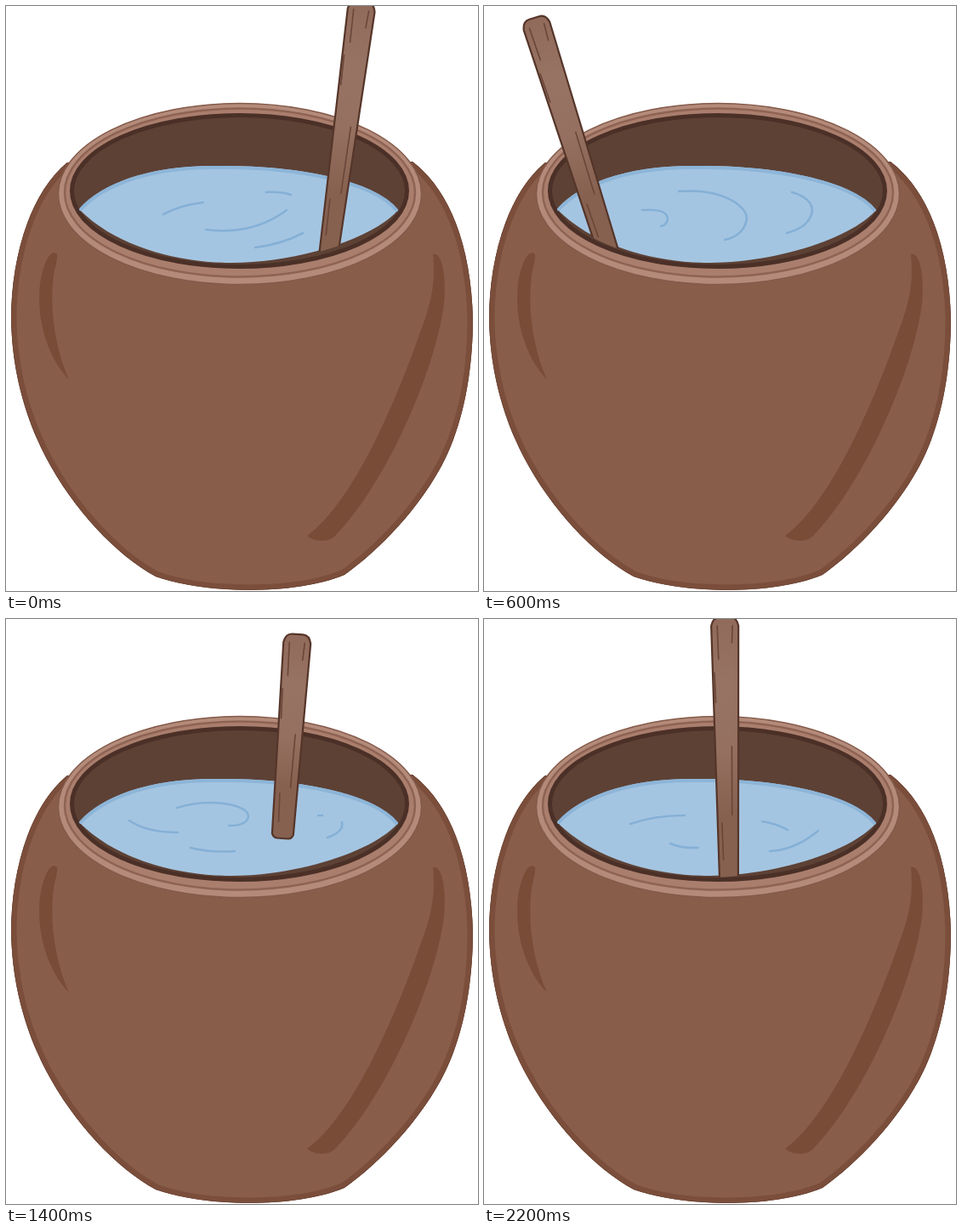
Write an HTML page that moves like this. It is 555 px wide and 688 px high and loops after 2400 ms.

```html
<!DOCTYPE html>
<html lang="en">
<head>
<meta charset="utf-8">
<title>Stirring a clay pot</title>
<style>
html, body { margin: 0; width: 100%; height: 100%; overflow: hidden; background: #fff; }
svg { display: block; width: 555px; height: 688px; fill: none; stroke-linecap: round; stroke-linejoin: round; }
</style>
</head>
<body>
<svg viewBox="0 0 555 688">
  <defs>
    <path id="body" d="M72 184C26 222 6 300 6 368C7 430 23 485 47 531C79 592 130 646 176 671C235 692 340 693 398 669C450 632 500 573 522 520C541 475 549 420 549 368C547 290 526 220 478 183Z"/>
    <clipPath id="inBody"><use href="#body"/></clipPath>
    <clipPath id="abovePot"><path d="M0-20H555V242H463C430 277 340 303 265 304C200 304 128 284 84 241H0Z"/></clipPath>
    <linearGradient id="wood" x2="0" y2="1">
      <stop offset="0" stop-color="#906a5a"/>
      <stop offset=".25" stop-color="#977363"/>
      <stop offset=".5" stop-color="#957060"/>
      <stop offset=".75" stop-color="#866150"/>
      <stop offset="1" stop-color="#866150"/>
    </linearGradient>
  </defs>

  <g clip-path="url(#inBody)">
    <use href="#body" fill="#885d4a" stroke="#7b4e3b" stroke-width="13"/>
    <use href="#body" stroke="#6d4637" stroke-width="1.5"/>
  </g>
  <g fill="#794c38">
    <path d="M60 292C53 285 44 300 40 327C35 372 51 416 74 439C57 401 50 350 57 311Q61 297 60 292Z"/>
    <path d="M502 292C513 288 518 320 515 350C505 430 446 562 388 622C380 632 362 630 354 623C408 584 459 465 489 378C504 340 504 315 502 292Z"/>
  </g>

  <ellipse cx="275" cy="221" rx="213.500" ry="106.500" fill="#b48b7a" stroke="#845a4a" stroke-width="1.500"/>
  <ellipse cx="275" cy="219.500" rx="206" ry="99" fill="#aa7e6d" stroke="#8e6353" stroke-width="2.500"/>
  <ellipse cx="274.500" cy="217.500" rx="197" ry="89" fill="#5d4135" stroke="#4b3027" stroke-width="5"/>
  <path d="M86 239C112 210 165 187 250 188C335 187 432 203 461 240C430 275 340 302 265 302C200 302 128 282 86 239Z" fill="#a4c5e1"/>
  <path d="M88 239C113 212 166 189 250 190C334 189 430 205 459 240" stroke="#8db5d8" stroke-width="4"/>
  <path id="ripples" stroke="#85b0d6" stroke-width="2.600"/>

  <g clip-path="url(#abovePot)">
    <g id="stick">
      <path id="shaft" fill="url(#wood)" stroke="#553529" stroke-width="2.200"/>
      <path id="grain" stroke="#694638" stroke-width="1.600"/>
    </g>
  </g>
</svg>
<script>
const $ = id => document.getElementById(id);

// Each pose: top x, y, bottom x, y of the stick, its foot width, and the ripples.
const poses = [
  [419, -5, 379, 294, 22, "M185 245Q205 234 232 231M235 263Q290 270 330 240M306 219Q322 218 335 222M293 284Q325 280 349 267"],
  [283, -2, 288, 308, 22, "M172 241Q200 231 236 231M219 264Q233 270 252 269M327 238Q345 241 357 248M336 273Q365 272 393 249"],
  [153, 7, 200, 303, 23, "M150 240Q147 244 149 248M252 226C310 219 360 230 361 256Q358 276 328 276M253 262Q280 264 299 257M374 236Q392 236 397 249"],
  [59, 14, 147, 292, 24, "M186 240Q215 238 216 250Q215 258 208 259M229 218C280 214 309 235 309 250Q306 270 283 275M362 219Q386 226 386 241Q383 260 356 267"],
  [195, 9, 231, 257, 24, "M146 232Q160 245 190 246M253 217C295 213 318 230 311 243Q304 253 283 256M250 272Q275 275 295 270M373 229Q394 236 385 254"],
  [343, 18, 325, 258, 25, "M145 237Q165 251 202 251M201 222C240 210 285 218 285 232Q284 243 262 243M217 269Q240 275 269 273M367 231h5M395 239Q398 250 378 257"]
];

function drawPose([x, y, bx, by, foot, ripples]) {
  const len = Math.hypot(bx - x, by - y);
  const angle = Math.atan2(x - bx, by - y) * 180 / Math.PI;
  const b = foot / 2;
  $("stick").setAttribute("transform", `translate(${x} ${y}) rotate(${angle})`);
  $("shaft").setAttribute("d",
    `M-16 10Q-14 0 -6 0H6Q14 0 16 10L${b} ${len - 5}Q${b - 2} ${len} ${b - 6} ${len}H${6 - b}Q${2 - b} ${len} ${-b} ${len - 5}Z`);
  $("grain").setAttribute("d",
    `M-9 10L-8 49M9 10L8 30M6 ${len * .49}L5 ${len * .75}M-7 ${len * .78}L-6 ${len * .92}M-13 65L-12 100`);
  $("ripples").setAttribute("d", ripples);
}

// One full turn forward, then the same turn backward.
function frame() {
  const step = Math.floor(performance.now() / 200) % 12;
  drawPose(poses[Math.min(step, 12 - step) % 6]);
  requestAnimationFrame(frame);
}
frame();
</script>
</body>
</html>
```
